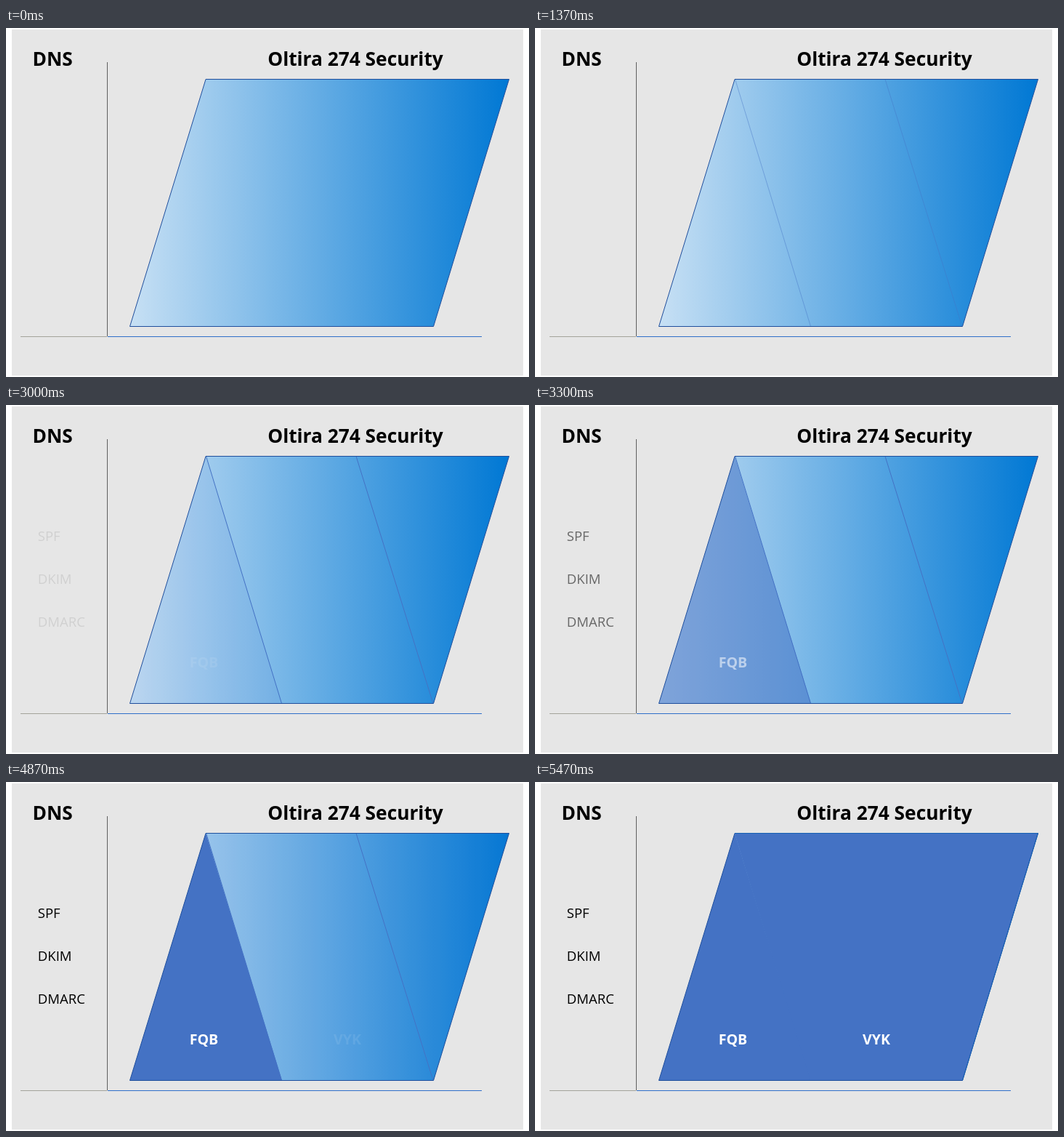
Animation, 720 px wide and 480 px high, one loop 6670 ms. Source, as an HTML page:

```html
<!DOCTYPE html>
<html lang="en">
<head>
<meta charset="utf-8">
<title>Security layers</title>
<style>
  html, body { margin: 0; width: 100%; height: 100%; overflow: hidden; background: #fff; }
  svg { display: block; width: 720px; height: 480px; font-family: "Open Sans", "Noto Sans", sans-serif; }
  .title, .tag { font-weight: 700; }
  .title { font-size: 26.3px; }
  .tag { font-size: 19.6px; fill: #fff; text-anchor: middle; }
  .label { font-size: 18.5px; }
  .line { fill: none; stroke-width: 1; }
</style>
</head>
<body>
<svg viewBox="0 0 720 480">
  <defs>
    <linearGradient id="sky">
      <stop offset="0" stop-color="#c7e0f4"/>
      <stop offset="1" stop-color="#0078d4"/>
    </linearGradient>
  </defs>
  <rect x="8" y="2" width="704" height="476" fill="#e6e6e6"/>

  <text class="title" x="36.5" y="52">DNS</text>
  <text class="title" x="481" y="52" text-anchor="middle">Oltira 274 Security</text>

  <path class="line" stroke="#a3a39b" d="M20 424.5H139"/>
  <path class="line" stroke="#2f6fc9" d="M140 424.5H655"/>
  <path class="line" stroke="#5f5f5f" d="M139.5 47V424"/>

  <path fill="url(#sky)" d="M275 70.5H692.5L588.5 410.5H170.5Z"/>
  <path id="split" class="line" stroke="#4472c4" d="M275.5 70.5L379.5 410.5M482 70.5L588 410.5"/>
  <path id="left" fill="#4472c4" d="M275 70.5L380 410.5H170.5Z"/>
  <path id="right" fill="#4472c4" d="M275 70.5H692.5L588.5 410.5H379.5Z"/>
  <path class="line" stroke="#1f4e9c" d="M275 70.5H692.5L588.5 410.5H170.5Z"/>
  <path id="edge" class="line" stroke="#1762b5" d="M275 70.5H692.5L588.5 410.5"/>

  <g id="records">
    <text class="label" x="43.8" y="187">SPF</text>
    <text class="label" x="43.8" y="246">DKIM</text>
    <text class="label" x="43.8" y="305">DMARC</text>
    <text class="tag" x="272.5" y="361">FQB</text>
  </g>
  <text id="extra" class="tag" x="470" y="361">VYK</text>
</svg>
<script>
  const LOOP = 6670, STEP = 60, STEPS = 11;
  const fades = [
    { start: 1130, ids: ["split"] },
    { start: 3000, ids: ["left", "records"] },
    { start: 4870, ids: ["right", "edge", "extra"] }
  ];
  for (const fade of fades) fade.parts = fade.ids.map(id => document.getElementById(id));

  // Each fade rises in equal steps, the first one visible at its start.
  function level(t, start) {
    const n = Math.floor((t - start) / STEP) + 1;
    return Math.min(Math.max(n, 0), STEPS) / STEPS;
  }

  function draw(t) {
    for (const { start, parts } of fades) {
      const alpha = level(t, start);
      for (const part of parts) part.setAttribute("opacity", alpha);
    }
  }

  const begin = performance.now();
  function tick() {
    draw((performance.now() - begin) % LOOP);
    requestAnimationFrame(tick);
  }
  tick();
</script>
</body>
</html>
```
